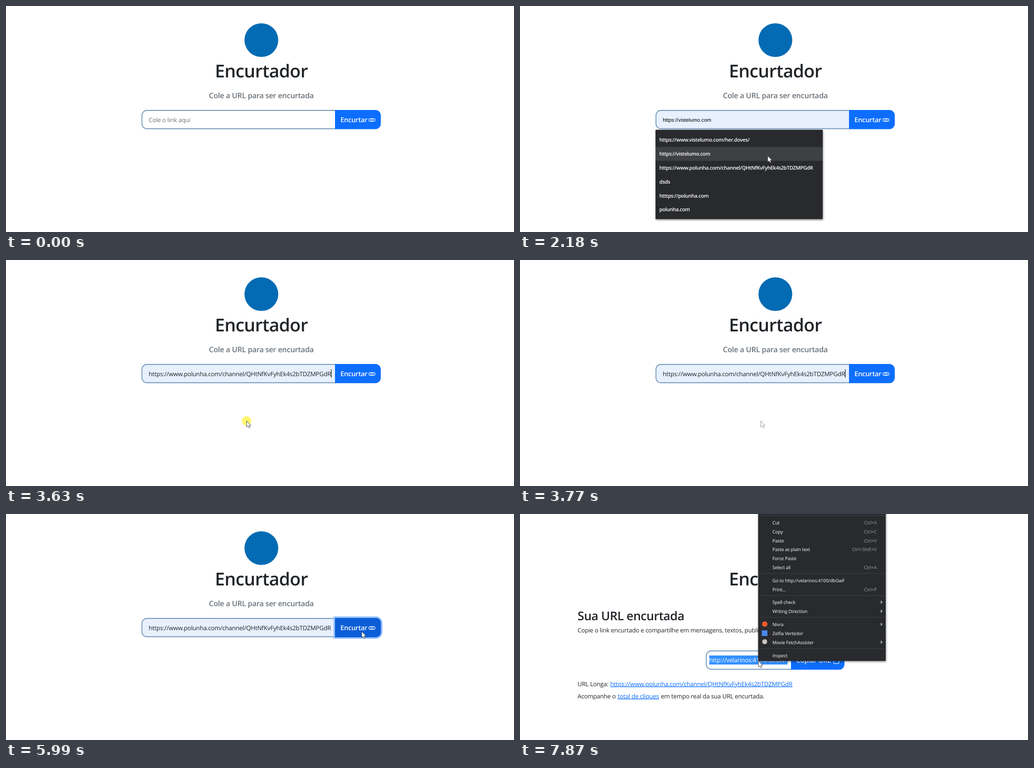
Animation of 1121x500 px, one loop 8000 ms. Source, as an HTML page:

```html
<!DOCTYPE html>
<html lang="pt">
<head>
<meta charset="utf-8">
<title>Encurtador</title>
<style>
  html, body { margin: 0; width: 100%; height: 100%; overflow: hidden; background: #fff; }
  svg { display: block; width: 1121px; height: 500px; }
  text { font-family: "Open Sans", "Noto Sans", sans-serif; fill: #212529;
         letter-spacing: -.015em; text-rendering: geometricPrecision; white-space: pre; }
  .semi { font-weight: 600; letter-spacing: -.018em; }
  .mid { text-anchor: middle; }
  .end { text-anchor: end; }
  .muted { fill: #6c757d; }
  .white { fill: #fff; }
  .link { fill: #0d6efd; text-decoration: underline; }
  .option { fill: #fff; letter-spacing: -.035em; }
  .preview { font-family: "Liberation Sans", Arial, sans-serif; letter-spacing: 0; fill: #000; }
  .keys { fill: #9aa0a6; }
  .field { fill: #fff; stroke: #7195b8; stroke-width: 1.8; }
  .button { fill: #0d6efd; }
  .icon { fill: none; stroke: #fff; stroke-width: 1.2; }
  .shadow { filter: drop-shadow(1px 2px 2px rgba(0, 0, 0, .45)); }
</style>
</head>
<body>
<svg id="stage" viewBox="0 0 1121 500"></svg>
<script>
const LOOP = 8000;
const LONG_URL = 'https://www.polunha.com/channel/QHtNfKvFyhEk4s2bTDZMPGdR';
const SHORT_URL = 'http://velarinos:4100/dbGwF';
const OPTIONS = ['https://www.vistelumo.com/her.doves/', 'https://vistelumo.com', LONG_URL,
                 'dsds', 'htttps://polunha.com', 'polunha.com'];
const ROW_TOP = 281, ROW_HEIGHT = 30.8;

const text = (x, y, size, cls, str, id = '') =>
  `<text id="${id}" x="${x}" y="${y}" font-size="${size}" class="${cls}">${str}</text>`;
const leftRound = (x, y, w, h, r) =>
  `M${x + w} ${y}H${x + r}a${r} ${r} 0 0 0 ${-r} ${r}v${h - 2 * r}a${r} ${r} 0 0 0 ${r} ${r}H${x + w}Z`;
const rightRound = (x, y, w, h, r) =>
  `M${x} ${y}h${w - r}a${r} ${r} 0 0 1 ${r} ${r}v${h - 2 * r}a${r} ${r} 0 0 1 ${-r} ${r}H${x}Z`;

// Context menu: row centre, label, shortcut ('>' opens a submenu)
const MENU = [
  [19, 'Cut', 'Ctrl+X'], [39, 'Copy', 'Ctrl+C'], [58.5, 'Paste', 'Ctrl+V'],
  [78, 'Paste as plain text', 'Ctrl+Shift+V'], [98, 'Force Paste', ''], [117.5, 'Select all', 'Ctrl+A'],
  [146.5, 'Go to ' + SHORT_URL, ''], [166.5, 'Print...', 'Ctrl+P'],
  [195, 'Spell check', '>'], [215, 'Writing Direction', '>'],
  [244, 'Nivra', '>'], [264, 'Zelfia Vertedor', ''], [283.5, 'Movie FetchAssister', '>'],
  [312.5, 'Inspect', '']
];
const menuRow = ([y, label, keys]) =>
  text(557, y + 4, 10.2, 'white', label) +
  (keys === '>' ? `<path d="M796 ${y - 4}l4.5 4-4.5 4Z" fill="#9aa0a6"/>`
                : text(787, y + 4, 10.2, 'keys end', keys));

document.getElementById('stage').innerHTML = `
  <circle cx="563.5" cy="75.5" r="37.3" fill="#036bb4"/>
  ${text(563.5, 158, 39.3, 'semi mid', 'Encurtador')}

  <g id="form">
    ${text(563.5, 204, 16.5, 'semi mid muted', 'Cole a URL para ser encurtada')}
    <path id="field" class="field" d="${leftRound(300, 231, 427, 40.5, 11)}"/>
    ${text(315, 256.5, 13.4, 'muted', 'Cole o link aqui', 'hint')}
    ${text(315, 256.3, 11.4, 'preview', '', 'preview')}
    ${text(315, 256.5, 13.4, '', LONG_URL, 'value')}
    <rect id="caret" y="242" width="1.2" height="18" fill="#000"/>
    <path id="ring" d="${rightRound(724.5, 228.3, 104.5, 46, 13)}" fill="#0b5ed7" stroke="#98c1fe" stroke-width="3.5"/>
    <path id="shorten" class="button" d="${rightRound(726, 230, 101, 42.5, 12)}"/>
    ${text(738, 257, 14.8, 'semi white', 'Encurtar')}
    <g class="icon">
      <rect x="800.6" y="249.2" width="9.2" height="6.2" rx="3.1"/>
      <rect x="805.2" y="249.2" width="9.2" height="6.2" rx="3.1"/>
    </g>
    <g id="list">
      <rect class="shadow" x="299" y="273.8" width="369" height="197.7" rx="1" fill="#292a2d"/>
      <rect id="hover" x="299" width="369" height="${ROW_HEIGHT}" fill="#3f4042"/>
      ${OPTIONS.map((o, i) => text(307.5, 300.3 + i * ROW_HEIGHT, 11.3, 'semi option', o)).join('')}
    </g>
  </g>

  <g id="result">
    ${text(127, 235, 26.6, 'semi', 'Sua URL encurtada')}
    ${text(127, 262.3, 13.4, '', 'Copie o link encurtado e compartilhe em mensagens, textos, publicações, sites e outros locais.')}
    <path class="field" d="${leftRound(411, 303, 188, 40.5, 11)}"/>
    <rect id="selection" x="417.5" y="313" height="20" fill="#3390ff"/>
    ${text(417.5, 328.3, 13.4, '', SHORT_URL, 'short')}
    <path id="copy" class="button" d="${rightRound(598, 302, 118, 42.5, 12)}"/>
    ${text(609.5, 329, 14.8, 'semi white', 'Copiar URL')}
    <path class="icon" d="M695 317.5h-1.3q-1.5 0-1.5 1.5v10.3q0 1.5 1.5 1.5h8.6q1.5 0 1.5-1.5V319q0-1.5-1.5-1.5H701M695.3 316.3h5.4v2.4h-5.4Z"/>
    ${text(127, 380.7, 13.4, '', 'URL Longa:')}
    ${text(199, 380.7, 13.4, 'link', LONG_URL)}
    ${text(127, 407.7, 13.4, '', 'Acompanhe o')}
    ${text(215.5, 407.7, 13.4, 'link', 'total de cliques')}
    ${text(311, 407.7, 13.4, '', 'em tempo real da sua URL encurtada.')}
  </g>

  <g id="menu">
    <rect class="shadow" x="525.5" y="-10" width="281.5" height="335" fill="#292a2d"/>
    <path d="M527 3.5H806M527 131.5H806M527 180.5H806M527 228.5H806M527 297.5H806" stroke="#3f4043"/>
    ${MENU.map(menuRow).join('')}
    <circle cx="540" cy="243.5" r="6" fill="#f0592b"/>
    <rect x="533.5" y="257.5" width="12.5" height="12.5" fill="#4a86e8"/>
    <circle cx="540" cy="282.5" r="5.5" fill="#c9c4c2"/>
  </g>

  <g id="cursor">
    <circle id="halo" r="10.3" fill="#fff014" fill-opacity=".62"/>
    <path id="arrow" d="M0 0V13.5L3.1 10.7 5.2 15.3 7.6 14.3 5.6 9.8H9.7Z" fill="#fff" stroke="#333" stroke-width=".9"/>
    <path id="beam" d="M-3-7h2l1 1 1-1h2M0-6V6M-3 7h2l1-1 1 1h2" fill="none" stroke="#333" stroke-width="1.1"/>
  </g>`;

const el = {};
document.querySelectorAll('[id]').forEach(node => { if (node.id) el[node.id] = node; });
const show = (name, on) => { el[name].style.display = on ? '' : 'none'; };
const within = (t, spans) => spans.some(([a, b]) => t >= a && t < b);

const easeOut = p => 1 - (1 - p) ** 2;
const smooth = p => p * p * (3 - 2 * p);

// Pointer moves: first step, last step, step count, end x, end y, easing
const START = [1134, 550];
const MOVES = [
  [170, 660, 8, 612, 284, easeOut],
  [1390, 1460, 2, 591, 262, smooth],
  [1980, 2310, 6, 531, 356, smooth],
  [4100, 4230, 3, 532, 368, smooth],
  [4500, 5240, 12, 746, 256, smooth],
  [5310, 5310, 1, 785, 260, smooth],
  [6130, 6270, 3, 759, 336, smooth],
  [6870, 6935, 2, 683, 338, smooth],
  [7000, 7000, 1, 567, 333, smooth],
  [7065, 7130, 2, 528, 325, smooth],
  [7800, 7800, 1, 526, 325, smooth]
];
const CLICKS = [[1570, 1710], [3500, 3640], [5720, 5860], [7330, 7600], [7800, 7870]];
const CARET = [[1570, 2180], [2710, 3240], [3570, 4230], [4760, 5240]];

function pointerAt(t) {
  let [x, y] = START;
  for (const [first, last, steps, toX, toY, ease] of MOVES) {
    if (t < first) break;
    const step = steps === 1 ? 1 : Math.min(steps, Math.floor((t - first) / (last - first) * (steps - 1) + 1.001));
    const p = ease(step / steps);
    x += (toX - x) * p;
    y += (toY - y) * p;
  }
  return [x, y];
}

function draw(t) {
  const [x, y] = pointerAt(t);
  const over = (left, top, right, bottom) => x >= left && x < right && y >= top && y < bottom;
  const onForm = t < 6060;
  const listOpen = t >= 1570 && t < 3570;
  const filled = t >= 3570;
  const menuOpen = t >= 7800;
  const row = listOpen && y >= ROW_TOP ? Math.floor((y - ROW_TOP) / ROW_HEIGHT) : -1;

  show('form', onForm);
  show('result', !onForm);
  show('list', listOpen);
  show('hover', row >= 0);
  show('hint', !filled && row < 0);
  show('preview', row >= 0);
  show('value', filled);
  show('ring', t >= 5720);
  show('caret', within(t, CARET));
  if (row >= 0) {
    el.hover.setAttribute('y', ROW_TOP + row * ROW_HEIGHT);
    el.preview.textContent = OPTIONS[row];
  }
  el.field.style.fill = filled || row >= 0 ? '#e8f0fe' : '#fff';
  if (onForm) {
    const end = filled ? Math.min(724, 315 + el.value.getComputedTextLength()) : 314;
    el.caret.setAttribute('x', end);
  }
  el.shorten.style.fill = over(726, 230, 827, 273) ? '#0b5ed7' : '';
  el.copy.style.fill = over(598, 302, 716, 345) ? '#0b5ed7' : '';

  const selected = t >= 7400;
  show('selection', selected);
  if (selected) el.selection.setAttribute('width', el.short.getComputedTextLength());
  el.short.style.fill = selected ? '#fff' : '';
  show('menu', menuOpen);

  const beam = onForm ? over(299, 230, 726, 273) : !menuOpen && over(410, 302, 598, 345);
  show('cursor', t >= 170);
  show('halo', within(t, CLICKS));
  show('beam', beam);
  show('arrow', !beam);
  el.arrow.style.opacity = t >= 3770 && t < 4100 ? .6 : 1;
  el.cursor.setAttribute('transform', `translate(${x} ${y})`);
}

const origin = performance.now();
function tick() {
  draw((performance.now() - origin) % LOOP);
  requestAnimationFrame(tick);
}
tick();
</script>
</body>
</html>
```
